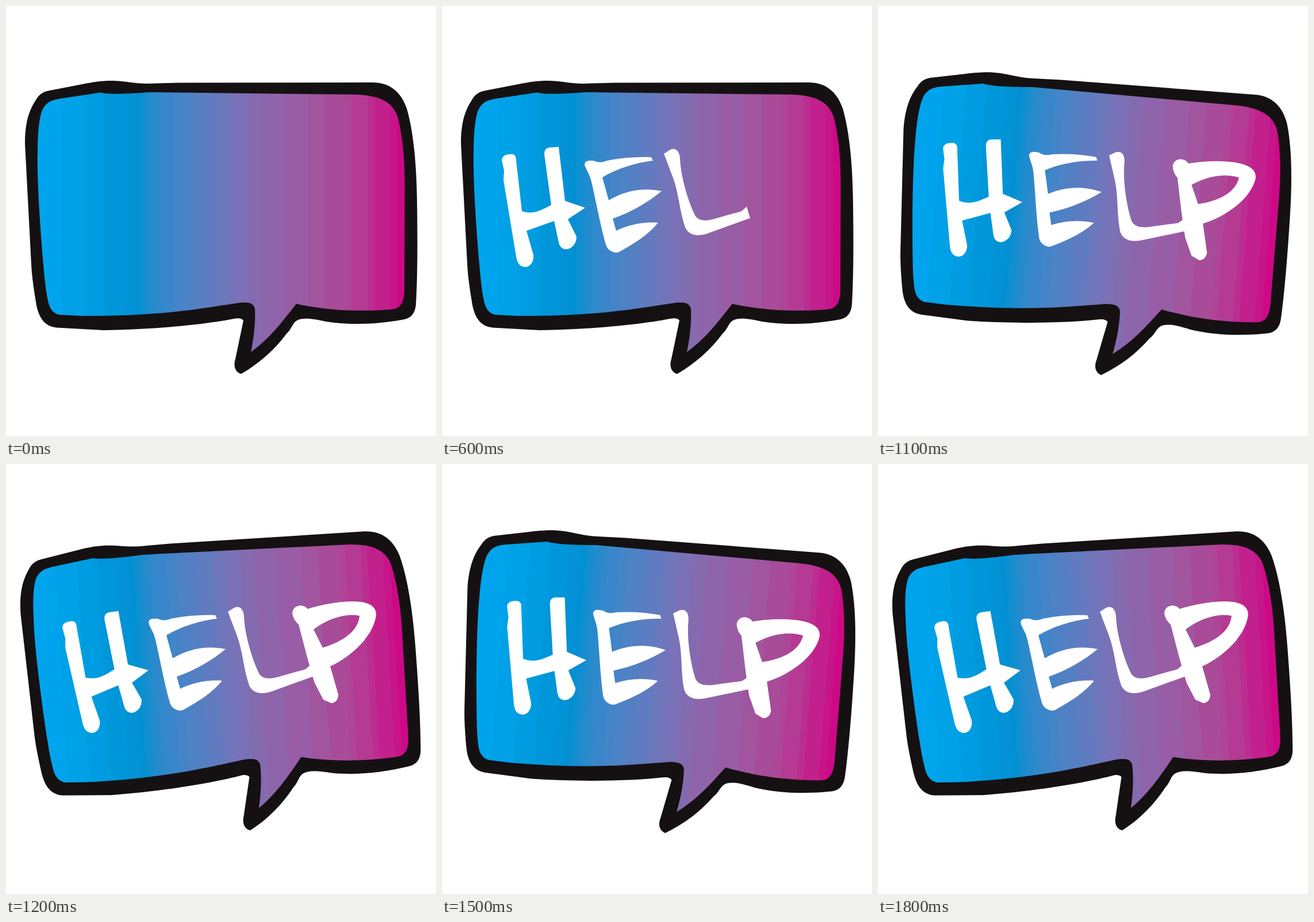
These frames come from a looping animation (748 by 748 pixels, 1.9 s). An HTML page:

```html
<!DOCTYPE html>
<html lang="en">
<head>
<meta charset="utf-8">
<title>Help bubble</title>
<style>
  html, body { margin: 0; width: 100%; height: 100%; overflow: hidden; background: #fff; }
  svg { display: block; width: 100vw; height: 100vh; }
</style>
</head>
<body>
<svg viewBox="0 0 748 748" role="img" aria-label="HELP">
  <defs>
    <linearGradient id="bands" gradientUnits="userSpaceOnUse" x1="50" y1="0" x2="700" y2="0"></linearGradient>
  </defs>
  <g id="bubble">
    <path fill="#151112" d="M76 147 L133 136 C153 132 167 130 182 130 C208 130 220 135 247 135
      L300 133.500 L638 133 C667 133 687 149 697 178 C708 215 714 270 715 340
      C716 410 716 470 713 520 C711 537 703 544 688 546
      C650 553 600 556 557 549 C535 544 517 541 506 547
      C498 552 497 562 488 570 C468 597 442 621 409 640
      C399 637 395 627 399 614 L413 547 C411 544 405 542 397 544
      C340 555 250 563 170 564 L88 559.500 C66 557 56 541 52 515
      C48 490 45 470 44 450 L33 240 C33 203 40 182 51 165 C57 154 64 149 76 147 Z"/>
    <path fill="url(#bands)" d="M95 161 L165 150.500 C178 154 210 153 250 150 L606 154
      C650 155 674 167 682 195 C691 232 694 275 693.500 320 L693 495
      C692 519 685 527 668 528 C615 532 560 530 505 518
      C481 549 457 580 426 602 C432 574 434 548 433 527
      C431 517 423 515 408 516 C340 526 270 540 130 539 L92 537
      C78 533 74 522 71 502 C65 465 53 310 55 255
      C55 220 58 196 62 184 C69 167 78 164 95 161 Z"/>
  </g>
  <g fill="#fff">
    <path id="H" d="M104 268 C105 259 113 258 121 257.500 C127 258 129 262 129 269 L139 357
      C157 362 166 359 190 346 L178 258 C178 249 182 246 191 246 L203 245 L214 339
      L249 351 L219 371 L234 401 C234 413 227 421 218 423 C209 424 205 419 203 411
      L195 374 L147 391 L159 433 C160 443 155 453 146 454 C135 454 131 447 129 436
      L107 303 L108 287 Z"/>
    <path id="E" d="M248 276 C249 268 256 269 264 269 C272 273 280 272 287 269
      C312 264 338 262 364 263 L367 269 C335 273 304 283 279 298 L290 338
      C317 322 348 315 382 322 C358 342 328 359 297 370 L303 391
      C326 380 351 375 376 377 C360 397 335 413 308 428
      C300 431 290 426 286 418 C276 385 266 330 260 306 C257 292 250 284 248 276 Z"/>
    <path id="L" d="M386 257 L397 250 C406 246 413 252 414 265 C415 295 427 336 439 362
      C444 373 455 375 471 371 L521 357 L530 349 L536 369 L461 396
      C442 402 429 398 423 385 C413 356 412 326 402 299 Z"/>
    <path id="P" fill-rule="evenodd" d="M498 259 C500 247 510 244 520 248 L525 252
      C550 244 575 240 600 239 C630 239 643 246 644 261 C641 297 603 334 564 352
      L578 401 C578 409 574 415 566 416 L552 410 L537 381 C527 350 517 309 509 279
      C503 274 499 267 498 259 Z
      M535 288 L551 319.500 C589 308 613 289 615 264 C588 259 557 271 535 288 Z"/>
  </g>
</svg>
<script>
const LOOP = 1900;
const appear = { H: 200, E: 400, L: 600, P: 800 };
const SHAKE_START = 1100, SHAKE_STEP = 100;
const RIGHT = 4.45, LEFT = -3.5;

// Anchor colours along x, sampled once per hard-edged band.
const anchors = [
  [55, 0, 166, 240], [115, 0, 161, 230], [185, 0, 151, 219], [230, 3, 144, 210],
  [260, 42, 138, 204], [300, 68, 132, 200], [350, 93, 124, 193], [400, 119, 115, 184],
  [450, 139, 103, 172], [500, 152, 94, 167], [550, 163, 83, 157],
  [600, 175, 68, 150], [640, 190, 42, 143], [690, 205, 9, 136]
];
const edges = [50, 98, 136, 160, 172, 205, 226, 234, 240, 247, 254, 262, 273, 292, 307,
  323, 345, 370, 386, 398, 420, 443, 479, 488, 525, 555, 590, 602, 630, 641, 668, 680, 700];

const byId = id => document.getElementById(id);

function colourAt(x) {
  let i = 1;
  while (i < anchors.length - 1 && anchors[i][0] < x) i++;
  const a = anchors[i - 1], b = anchors[i];
  const k = Math.min(1, Math.max(0, (x - a[0]) / (b[0] - a[0])));
  return `rgb(${[1, 2, 3].map(c => Math.round(a[c] + (b[c] - a[c]) * k))})`;
}

function addStop(x, colour) {
  const stop = document.createElementNS("http://www.w3.org/2000/svg", "stop");
  stop.setAttribute("offset", (x - 50) / 650);
  stop.setAttribute("stop-color", colour);
  byId("bands").append(stop);
}

for (let i = 1; i < edges.length; i++) {
  const colour = colourAt((edges[i - 1] + edges[i]) / 2);
  addStop(edges[i - 1], colour);
  addStop(edges[i], colour);
}

const turn = (id, angle) => byId(id).setAttribute("transform", `rotate(${angle} 374 374)`);

function draw(t) {
  for (const id in appear) byId(id).style.display = t >= appear[id] ? "" : "none";
  let angle = 0;
  if (t >= SHAKE_START) {
    angle = Math.floor((t - SHAKE_START) / SHAKE_STEP) % 2 ? LEFT : RIGHT;
  }
  turn("bubble", angle);
  turn("H", angle);
  // E, L and P already lean left while they are being written.
  for (const id of ["E", "L", "P"]) turn(id, angle > 0 ? RIGHT - LEFT : 0);
}

const start = performance.now();
function tick() {
  draw((performance.now() - start) % LOOP);
  requestAnimationFrame(tick);
}
tick();
</script>
</body>
</html>
```
